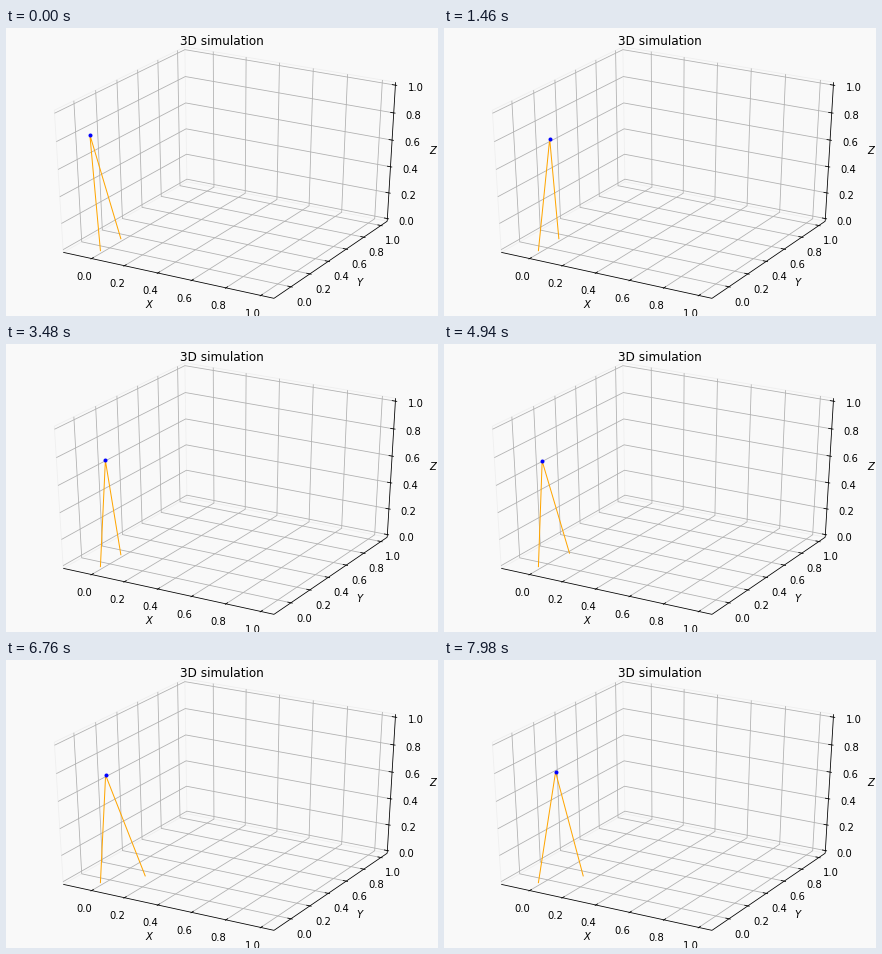
Animation of 432x288 px, one loop 8000 ms. Source, as a matplotlib script:

```python
import numpy as np
import matplotlib.pyplot as plt
from matplotlib.animation import FuncAnimation
from matplotlib.collections import LineCollection

WIDTH, HEIGHT, DPI = 432, 288, 72
FRAMES, INTERVAL = 400, 20
PHASE = 2.0                 # seconds per movement phase
LOW, SPAN = -0.15, 1.2      # x and y limits; z runs from 0 to 1
EDGE = 0.5 + 1 / 48         # half size of the padded unit box
TICKS = np.linspace(0, 1, 6)

plt.rcParams["font.family"] = "DejaVu Sans"


def project(p):
    """Perspective view (elev 30, azim -60) of a centred unit box, in pixels."""
    x, y, z = np.asarray(p, float).T
    c = np.sqrt(3) / 2
    u = c * x + 0.5 * y
    v = -0.25 * x + c / 2 * y + c * z
    depth = 10 - (c / 2 * x - 0.75 * y + 0.5 * z)
    px = (10 * u / depth + 0.95) / 1.85 * WIDTH
    py = HEIGHT - (10 * v / depth + 0.95) / 1.85 * HEIGHT
    return np.column_stack([px, py])


def horizontal(value):
    return (value - LOW) / SPAN - 0.5


def to_box(x, y, z):
    return horizontal(x), horizontal(y), z - 0.5


def ease(tau):
    t = np.clip(tau, 0, 1)
    return t**3 * (10 - 15 * t + 6 * t**2)


fig = plt.figure(figsize=(WIDTH / DPI, HEIGHT / DPI), dpi=DPI, facecolor="#f9f9f9")
ax = fig.add_axes([0, 0, 1, 1])
ax.set_xlim(0, WIDTH)
ax.set_ylim(HEIGHT, 0)
ax.axis("off")


def add_lines(paths, color, width=0.8):
    ax.add_collection(LineCollection([project(p) for p in paths],
                                     colors=color, linewidths=width))


def add_text(point, text, va):
    x, y = project([point])[0]
    ax.text(x, y, text, fontsize=10, ha="center", va=va)


def draw_scene():
    E = EDGE
    add_lines([
        [(-E, -E, -E), (-E, E, -E), (-E, E, E), (-E, -E, E), (-E, -E, -E)],
        [(-E, E, -E), (E, E, -E), (E, E, E), (-E, E, E)],
    ], "#efefef")

    grid, marks = [], []
    out, inward = E + 0.1 / 12, E - 0.2 / 12
    far = E + 11.5 / 180     # tick label distance
    for value in TICKS:
        h, z = horizontal(value), value - 0.5
        label = f"{value:.1f}"
        grid += [[(h, -E, -E), (h, E, -E), (h, E, E)],
                 [(E, h, -E), (-E, h, -E), (-E, h, E)],
                 [(-E, -E, z), (-E, E, z), (E, E, z)]]
        marks += [[(h, -out, -E), (h, -inward, -E)],
                  [(out, h, -E), (inward, h, -E)],
                  [(out, E, z), (inward, E, z)]]
        for point in ((h, -far, -far), (far, h, -far), (far, far, z)):
            add_text(point, label, "top")
    add_lines(grid, "#b0b0b0")
    add_lines([[(-E, -E, -E), (E, -E, -E)],
               [(E, -E, -E), (E, E, -E)],
               [(E, E, -E), (E, E, E)]] + marks, "black")

    far = E + 25 / 180       # axis label distance
    add_text((0, -far, -far), "$X$", "center")
    add_text((far, 0, -far), "$Y$", "center")
    add_text((far, far, 0), "$Z$", "center")
    ax.text(WIDTH / 2, 17, "3D simulation", fontsize=12, ha="center", va="baseline")


def pose(t):
    """Standing foot, hip and stepping foot at time t in seconds."""
    forward, lean, step, back = (ease(t / PHASE - k) for k in range(4))
    late = max(t - 3 * PHASE, 0)
    hip_x = -0.15 * (1 - forward) - 0.0253 * late + 0.0169 * late**2
    hip_y = 0.09 - 0.1 * lean + 0.1 * back
    return [to_box(0, -0.09, 0),
            to_box(hip_x, hip_y, 0.75),
            to_box(0.15 * step, 0.108, 0.03 * np.sin(np.pi * step))]


draw_scene()
legs, = ax.plot([], [], color="orange", lw=1, solid_joinstyle="bevel", zorder=4)
hip, = ax.plot([], [], "o", color="blue", ms=3, zorder=5)


def update(frame):
    points = project(pose(frame * INTERVAL / 1000))
    legs.set_data(points[:, 0], points[:, 1])
    hip.set_data(points[1:2, 0], points[1:2, 1])
    return legs, hip


anim = FuncAnimation(fig, update, frames=FRAMES, interval=INTERVAL,
                     repeat=True, repeat_delay=0, blit=False)
plt.show()
```
